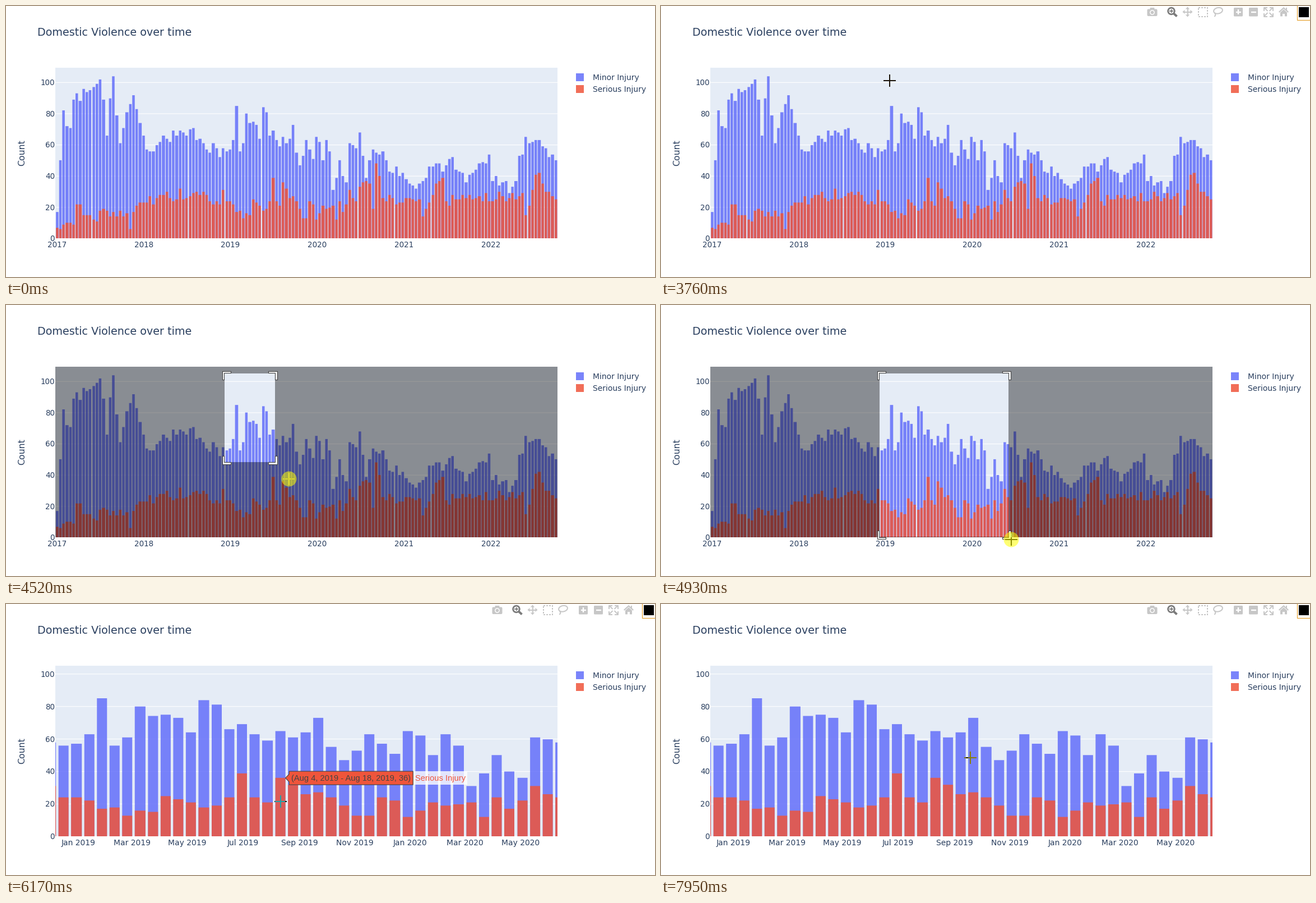
A matplotlib script for the animation above (8 s loop, 1158 by 483 pixels).

```python
import numpy as np
import matplotlib.pyplot as plt
from matplotlib.animation import FuncAnimation
from matplotlib.collections import PolyCollection
from matplotlib.patches import (Circle, Ellipse, FancyBboxPatch, PathPatch,
                                Polygon, Rectangle)
from matplotlib.path import Path

W, H, DPI = 1158, 483, 100
LOOP, STEP = 8000, 40
PT = 72 / DPI                      # points per pixel
UNIT = 1.125                       # page zoom of the chart
LEFT, RIGHT, TOP, BASE = 88, 984, 110, 414.4

INK, DARK = '#2a3f5f', '#444444'
BLUE, RED, PAPER = '#636efa', '#ef553b', '#e5ecf6'
IDLE, ACTIVE = '#c7c7c7', '#7c7c7c'
BAR_ALPHA = 0.85
FORTNIGHTS, DETAIL = 151, 50       # bar count, first bar of the close-up
DAY0 = np.datetime64('2017-01-01')


def series(knots, detail, spread, seed):
    """Trend through the knots with seeded scatter, plus the close-up counts."""
    at, value = zip(*knots)
    i = np.arange(FORTNIGHTS)
    noise = np.random.default_rng(seed).uniform(-spread, spread, FORTNIGHTS)
    noise[list(at)] = 0
    counts = np.round(np.interp(i, at, value) + noise).astype(int)
    counts[DETAIL:DETAIL + len(detail)] = detail
    return counts


MINOR = series(
    [(0, 17), (2, 82), (4, 71), (5, 89), (10, 95), (13, 102), (15, 66), (17, 104),
     (19, 61), (23, 92), (27, 57), (40, 70), (49, 52), (91, 68), (93, 39), (95, 57),
     (107, 34), (118, 51), (123, 36), (130, 54), (131, 37), (137, 33), (141, 65),
     (150, 50)],
    [58, 56, 57, 63, 85, 56, 61, 80, 74, 75, 73, 64, 84, 81, 66, 69, 63, 59, 65, 61, 64,
     73, 55, 47, 53, 63, 57, 51, 65, 62, 50, 63, 56, 31, 39, 50, 40, 36, 61, 60, 58],
    5, 4)
SERIOUS = series(
    [(0, 7), (5, 9), (6, 22), (8, 15), (21, 16), (22, 6), (23, 17), (31, 28), (43, 28),
     (49, 22), (94, 35), (95, 19), (96, 48), (98, 26), (109, 25), (110, 14),
     (116, 39), (117, 24), (140, 29), (141, 15), (144, 41), (150, 25)],
    [31, 24, 24, 22, 17, 18, 13, 16, 15, 25, 23, 21, 18, 19, 24, 39, 24, 21, 36, 32, 26,
     27, 24, 19, 13, 13, 24, 22, 12, 16, 21, 19, 20, 21, 12, 24, 17, 22, 31, 26, 24],
    4, 9)

fig = plt.figure(figsize=(W / DPI, H / DPI), dpi=DPI, facecolor='white')
ax = fig.add_axes([0, 0, 1, 1])
ax.set(xlim=(0, W), ylim=(H, 0))
ax.axis('off')


def rgb(color):
    return np.array(plt.matplotlib.colors.to_rgb(color))


def blend(top, under, alpha):
    return alpha * rgb(top) + (1 - alpha) * under


PAPER_RGB = rgb(PAPER)
MINOR_RGB = blend(BLUE, PAPER_RGB, BAR_ALPHA)
SERIOUS_RGB = blend(RED, MINOR_RGB, BAR_ALPHA)


def add(patch, z=1):
    patch.set_zorder(z)
    return ax.add_patch(patch)


def label(x, y, text, size, color=INK, z=3, font='DejaVu Sans', **kw):
    return ax.text(x, y, text, size=size * PT, color=color, zorder=z,
                   family=font, **kw)


def line(xs, ys, color, width, z=6, **kw):
    return ax.plot(xs, ys, color=color, lw=width * PT, zorder=z,
                   solid_capstyle='butt', **kw)[0]


class View:
    """One zoom state of the chart: scales, bars, grid and tick labels."""

    def __init__(self, first, last, top, ticks, tick_size):
        self.first, self.last, self.top = first, last, top
        self.artists = []
        centers = 14 * np.arange(FORTNIGHTS)
        x0 = self.snap(self.x(centers - 5.6), LEFT)
        x1 = self.snap(self.x(centers + 5.6), LEFT)
        for counts, color, z in ((MINOR, BLUE, 1.2), (SERIOUS, RED, 1.3)):
            tops = self.snap(self.y(counts), BASE)
            bars = PolyCollection(
                [[(a, BASE), (a, t), (b, t), (b, BASE)]
                 for a, b, t in zip(x0, x1, tops)],
                facecolor=color, alpha=BAR_ALPHA, lw=0, zorder=z, snap=False)
            ax.add_collection(bars)
            bars.set_clip_path(plot_area)
            self.artists.append(bars)
        for v in range(0, 101, 20):
            y = self.y(v)
            self.artists.append(line([LEFT, RIGHT], [y, y], 'white',
                                     UNIT if v else 2 * UNIT, 1.1, snap=False))
            self.artists.append(label(87, y + 4.9, str(v), 13.5, ha='right'))
        for day, text in ticks:
            self.artists.append(label(self.x(day), 430, text, tick_size, ha='center'))

    @staticmethod
    def snap(v, origin):
        return origin + np.round((v - origin) / UNIT) * UNIT

    def x(self, day):
        return LEFT + (RIGHT - LEFT) * (day - self.first) / (self.last - self.first)

    def y(self, count):
        return BASE - (BASE - TOP) * count / self.top

    def color_at(self, x, y):
        if not (LEFT <= x <= RIGHT and TOP <= y <= BASE):
            return np.ones(3)
        day = self.first + (x - LEFT) / (RIGHT - LEFT) * (self.last - self.first)
        i = int(np.clip(round(day / 14), 0, FORTNIGHTS - 1))
        if abs(day - 14 * i) > 5.6:
            return PAPER_RGB
        if y >= self.y(SERIOUS[i]):
            return SERIOUS_RGB
        return MINOR_RGB if y >= self.y(MINOR[i]) else PAPER_RGB

    def show(self, on):
        for a in self.artists:
            a.set_visible(on)


def day_of(month):
    return int((np.datetime64(month + '-01') - DAY0).astype(int))


# Fixed parts
plot_area = add(Rectangle((LEFT, TOP), RIGHT - LEFT, BASE - TOP, fc=PAPER, lw=0))
years = [(day_of(f'{y}-01'), str(y)) for y in range(2017, 2023)]
months = [(day_of(str(m)), f'{m.astype(object):%b %Y}')
          for m in np.arange('2019-01', '2020-06', 2, dtype='datetime64[M]')]
full = View(-7, 2107, 104 / 0.95, years, 13.5)
zoomed = View(704.8, 1256.7, 105.1, months, 13.9)

label(56, 53, 'Domestic Violence over time', 19.1)
label(33.5, 262, 'Count', 15.75, rotation=90, rotation_mode='anchor', ha='center')
for y, text, color in ((120, 'Minor Injury', BLUE), (141, 'Serious Injury', RED)):
    add(Rectangle((1017.3, y), 13.5, 13.5, fc=color, alpha=BAR_ALPHA, lw=0))
    label(1047, y + 11.8, text, 13.9)
line([0, W], [H - 0.5] * 2, '#d0d0d0', 1)
line([W - 0.5] * 2, [0, H], '#d0d0d0', 1)

# Toolbar
MID = 10.5
toolbar = []


def tool(artist):
    toolbar.append(artist)
    return artist


def stroke(points, color=IDLE, width=2, **kw):
    xs, ys = zip(*points)
    return tool(line(xs, ys, color, width, **kw))


def shape(patch, z=6):
    return tool(add(patch, z))


def box(x, y, w, h, r, color):
    return FancyBboxPatch((x + r, y + r), w - 2 * r, h - 2 * r,
                          boxstyle=f'round,pad={r}', fc=color, lw=0)


def plus(x, y, r, color, width, upright=True, z=6.1):
    parts = [stroke([(x - r, y), (x + r, y)], color, width, z=z)]
    if upright:
        parts.append(stroke([(x, y - r), (x, y + r)], color, width, z=z))
    return parts


def camera(x):
    shape(box(x - 9, 5.5, 18, 12.5, 2, IDLE))
    shape(box(x - 4, 3, 8, 5, 1, IDLE))
    shape(Circle((x, 11.5), 4.4, fc='white', lw=0), 6.1)
    shape(Circle((x, 11.5), 2.9, fc=IDLE, lw=0), 6.2)


def magnifier(x, y):
    shape(Circle((x, y), 5.8, fill=False, ec=ACTIVE, lw=2.8 * PT))
    stroke([(x + 4, y + 4), (x + 10, y + 9.5)], ACTIVE, 4)
    plus(x, y, 3.3, ACTIVE, 1.8)


def four_way(x):
    parts = plus(x, MID, 7, IDLE, 2)
    for dx, dy in ((1, 0), (-1, 0), (0, 1), (0, -1)):
        tip = np.array([x + 9 * dx, MID + 9 * dy])
        back, side = np.array([dx, dy]) * 4, np.array([dy, dx]) * 3.6
        parts.append(shape(Polygon([tip, tip - back + side, tip - back - side],
                                   fc=IDLE, lw=0)))
    return parts


def lasso(x):
    shape(Ellipse((x, 8.3), 16, 10.5, angle=-12, fill=False, ec=IDLE, lw=2 * PT))
    stroke([(x - 6, 12), (x - 4.5, 16), (x - 6.5, 19)])


def resize(x):
    for dx in (-1, 1):
        for dy in (-1, 1):
            cx, cy = x + 8 * dx, MID + 8 * dy
            stroke([(cx - 6 * dx, cy), (cx, cy), (cx, cy - 6 * dy)])
            stroke([(cx, cy), (cx - 6.5 * dx, cy - 6.5 * dy)])


def home(x):
    stroke([(x - 8.2, 11), (x, 3.4), (x + 8.2, 11)], width=2.2)
    shape(Rectangle((x + 4, 3), 2.4, 5, fc=IDLE, lw=0))
    shape(Polygon([(x - 6, 18.4), (x - 6, 11.6), (x, 6), (x + 6, 11.6), (x + 6, 18.4)],
                  fc=IDLE, lw=0))
    shape(Rectangle((x - 1.8, 13.5), 3.6, 5.2, fc='white', lw=0), 6.1)


camera(876.5)
magnifier(910.5, 9)
pan_parts = four_way(939.5)
shape(Rectangle((958.5, 2.5), 16, 16, fill=False, ec=IDLE, lw=2 * PT, ls=(0, (1.5, 1))))
lasso(994)
for x, upright in ((1030, True), (1057, False)):
    shape(box(x - 8, 3, 16, 15.5, 1.5, IDLE))
    plus(x, MID, 4.5, 'white', 2.4, upright)
resize(1084)
home(1111)
shape(Rectangle((1138, 1.5), 18, 18, fc='black', lw=0))
focus = add(Rectangle((1134.5, -2), 23, 26.5, fill=False, ec='#e5a02c', lw=1.2 * PT), 6)


def tip_box(text, x0, x1, icon):
    fill = '#69738b'
    return [add(box(x0, 27, x1 - x0, 31.5, 2, fill), 7),
            add(Polygon([(icon - 6, 27.3), (icon, 21), (icon + 6, 27.3)], fc=fill, lw=0), 7),
            label((x0 + x1) / 2, 48.5, text, 13.5, 'white', 7.1, ha='center')]


TIPS = ((1650, 2180, tip_box('Pan', 912, 960, 940)),
        (2180, 2920, tip_box('Zoom', 871, 932.5, 912)))

# Zoom selection
mask = add(PathPatch(Path([(0, 0), (1, 1)]), fc='black', lw=0), 2)
corners = PolyCollection([], facecolor='white', edgecolor=DARK, lw=UNIT * PT, zorder=2.2)
ax.add_collection(corners)


def ring(x0, y0, x1, y1):
    return [(x0, y0), (x1, y0), (x1, y1), (x0, y1), (x0, y0)]


def corner(x, y, ox, oy, n):
    near, far = 0.56, 3.94
    return [(x + ox * far, y - oy * n), (x + ox * near, y - oy * n),
            (x + ox * near, y + oy * near), (x - ox * n, y + oy * near),
            (x - ox * n, y + oy * far), (x + ox * far, y + oy * far)]


# Hover label
hover_box = add(Polygon([(0, 0), (1, 1)], lw=UNIT * PT), 8)
hover_back = add(Rectangle((0, 0), 1, 24, fc='white', alpha=0.8, lw=0), 7.9)
hover_text = label(0, 0, '', 14.6, z=8.1, font='Liberation Sans')
hover_name = label(0, 0, '', 14.6, z=8.1, font='Liberation Sans')
hover_parts = (hover_box, hover_back, hover_text, hover_name)
HOVERS = ((6030, 6700, 68, 'Serious Injury'), (6700, 7060, 68, 'Minor Injury'),
          (7390, 7800, 69, 'Minor Injury'), (7800, 7930, 70, 'Minor Injury'))


def date_text(day):
    d = (DAY0 + int(day)).astype(object)
    return f'{d:%b} {d.day}, {d.year}'


def show_hover(i, name):
    serious = name.startswith('S')
    count = (SERIOUS if serious else MINOR)[i]
    fill, ink = (RED, DARK) if serious else (BLUE, 'white')
    x, y = zoomed.x(14 * i + 5.6), zoomed.y(count)
    hover_text.set_text(f'({date_text(14 * i - 7)} - {date_text(14 * i + 7)}, {count})')
    hover_text.set(position=(x + 10.6, y + 5.2), color=ink)
    left = x + 6.75
    right = left + hover_text.get_window_extent().width + 8
    hover_box.set_xy([(x, y), (left, y - 6.75), (left, y - 12), (right, y - 12),
                      (right, y + 12), (left, y + 12), (left, y + 6.75)])
    hover_box.set(facecolor=fill, edgecolor=ink)
    hover_name.set(text=name, position=(right + 3.5, y + 5.2), color=fill)
    hover_back.set(x=right, y=y - 12, width=hover_name.get_window_extent().width + 7)


# Pointers
ARROW = np.array([(0, 0), (0, 17), (4, 13.2), (6.7, 19), (9.3, 18), (6.6, 12.3), (12, 12)])
HAND = np.array([(-1.5, 0), (1.5, 0), (2, 8), (9.5, 10), (9.5, 16), (8, 21.5), (-2, 21.5),
                 (-7.5, 12), (-6, 11), (-2, 14.5)])
pointer = add(Polygon(ARROW, fc='white', ec='black', lw=1.1 * PT), 10)
cross = PolyCollection([], lw=0, antialiased=False, zorder=10)
ax.add_collection(cross)
press = add(Circle((0, 0), 13.5, fc='#ffff00', alpha=0.55, lw=0), 11)

ROUTE = (
    (390, 1112, 443), (600, 1062, 345), (1160, 986, 202), (1370, 985, 115),
    (1510, 965, 50), (1790, 936, 15.5), (2100, 936, 15.5), (2320, 910, 14),
    (2840, 910, 14), (2990, 850, 50), (3270, 600, 125), (3550, 430, 145),
    (3760, 408, 133), (4110, 389.7, 122), (4250, 408, 172), (4390, 448, 242),
    (4520, 505, 310), (4940, 625, 418), (5010, 634, 425), (5270, 634, 425),
    (5480, 624, 428), (5680, 622, 424), (6170, 490, 352), (6500, 489, 348),
    (7200, 479, 286), (7320, 479, 286), (7470, 518, 285), (7800, 518, 285),
    (7950, 552, 274))
TIMES, XS, YS = zip(*ROUTE)
STARTS = (0, 390, 1230, 2110, 2850, 3690, 4520, 5270, 5680, 6510, 7330, 7810)
HOLD = 70
SHOW, PRESS, RELEASE, ZOOM = 390, 4110, 5680, 5750


def place(t):
    return np.interp(t, TIMES, XS), np.interp(t, TIMES, YS)


def draw_selection(t):
    on = PRESS < t < ZOOM
    mask.set_visible(on)
    corners.set_visible(on)
    if not on:
        return 0, None
    x0, y0 = place(PRESS)
    x1, y1 = place(t - np.interp(t, [4390, 4940], [HOLD, 18]))
    x1, y1 = min(max(x1, x0 + 1), 623.6), min(max(y1, y0 + 1), BASE)
    fade = np.interp(t, [4180, 4460], [0, 1])
    codes = [Path.MOVETO] + [Path.LINETO] * 3 + [Path.CLOSEPOLY]
    mask.set_path(Path(ring(LEFT, TOP, RIGHT, BASE) + ring(x0, y0, x1, y1)[::-1], codes * 2))
    mask.set_alpha(0.4 * fade)
    n = min(11.25, (x1 - x0) / 2, (y1 - y0) / 2)
    corners.set_verts([corner(x, y, ox, oy, n) for x, ox in ((x0, -1), (x1, 1))
                       for y, oy in ((y0, -1), (y1, 1))])
    corners.set_alpha(fade)
    return 0.4 * fade, (x0, y0, x1, y1)


def draw_cross(view, x, y, dim, hole):
    """Cross whose every cell inverts the colour beneath it."""
    x, y = round(x), round(y)
    cells, colors = [], []
    for k in range(-11, 11):
        for a, b, w, h in ((x + k, y - 1, 1, 2), (x - 1, y + k, 2, 1)):
            px, py = a + w / 2, b + h / 2
            color = view.color_at(px, py)
            inside = hole and hole[0] < px < hole[2] and hole[1] < py < hole[3]
            if dim and not inside and LEFT < px < RIGHT and TOP < py < BASE:
                color = color * (1 - dim)
            cells.append(ring(a, b, a + w, b + h)[:4])
            colors.append(1 - color)
    cross.set_verts(cells)
    cross.set_facecolor(colors)


def draw(i):
    t = STEP * i + 30
    start = max(s for s in STARTS if s <= t)
    t = start + (t - start) // HOLD * HOLD
    view = zoomed if t >= ZOOM else full
    full.show(view is full)
    zoomed.show(view is zoomed)

    fade = np.interp(t, [SHOW, 670, PRESS, 4390, 4450, RELEASE, 5960],
                     [0, 1, 1, 0.08, 0, 0, 1])
    for a in toolbar:
        a.set_alpha(fade)
    for a in pan_parts:
        a.set_color(ACTIVE if 1650 <= t < 2180 else IDLE)
    focus.set_alpha(fade)
    focus.set_visible(t >= 2920)
    for t0, t1, parts in TIPS:
        for a in parts:
            a.set_visible(t0 <= t < t1)

    dim, hole = draw_selection(t)

    hover = next((h for h in HOVERS if h[0] <= t < h[1]), None)
    for a in hover_parts:
        a.set_visible(hover is not None)
    if hover:
        show_hover(*hover[2:])

    x, y = place(t)
    in_plot = LEFT < x < RIGHT and TOP < y < BASE
    use_cross = t >= SHOW and (in_plot or t >= PRESS)
    cross.set_visible(use_cross)
    pointer.set_visible(t >= SHOW and not use_cross)
    if use_cross:
        draw_cross(view, x, y, dim, hole)
    else:
        pointer.set_xy((HAND if y < 23 and x > 865 else ARROW) + (x, y))
    press.set_visible(PRESS <= t < RELEASE)
    press.center = x, y
    return []


anim = FuncAnimation(fig, draw, frames=LOOP // STEP, interval=STEP,
                     repeat=True, repeat_delay=0, blit=False)
plt.show()
```
